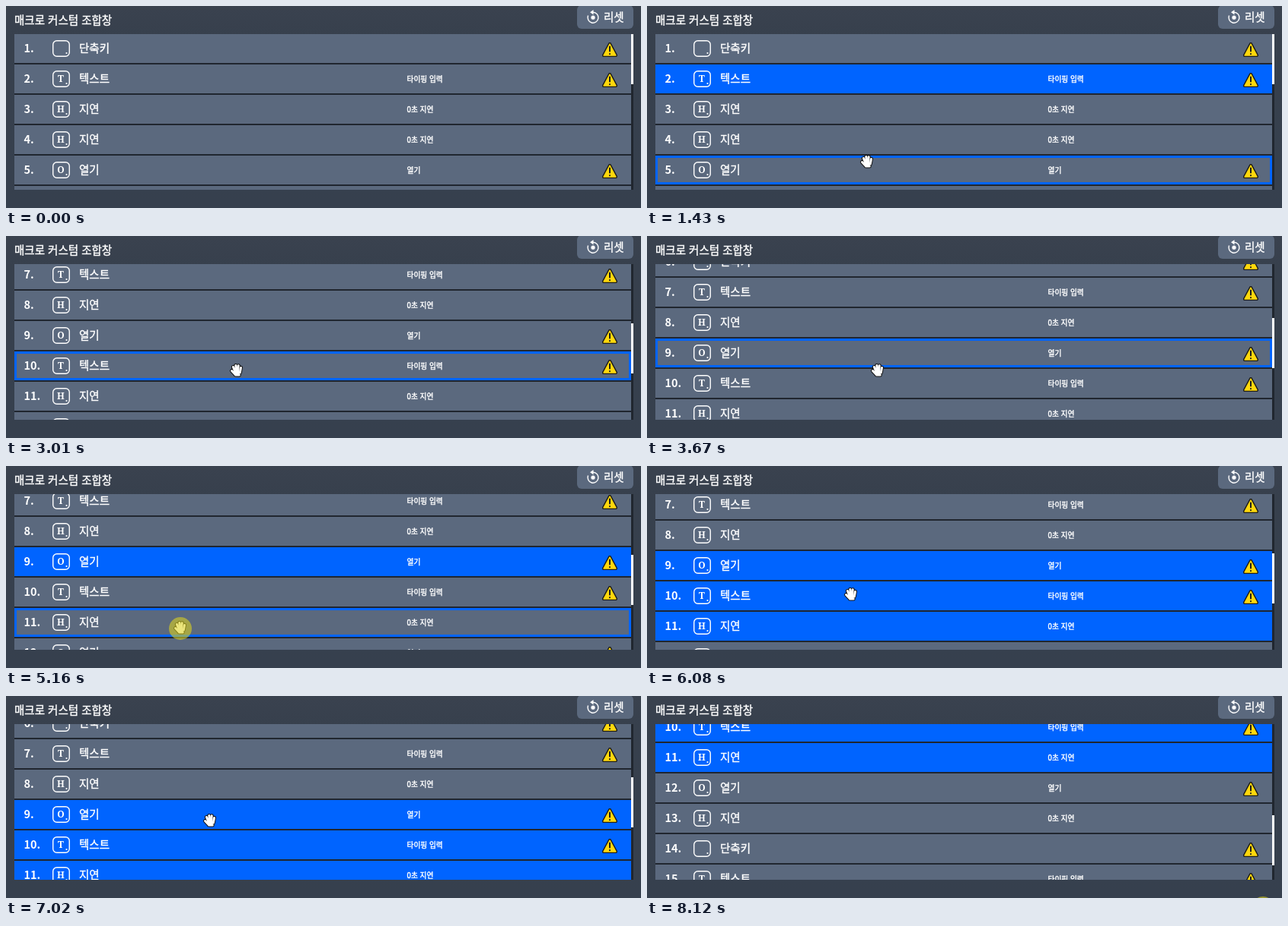
These frames come from a looping animation (834 px wide and 266 px high, 8.19 s). An HTML page:

```html
<!DOCTYPE html>
<html lang="ko">
<head>
<meta charset="utf-8">
<style>
html, body { margin: 0; width: 100%; height: 100%; overflow: hidden; background: #37404d; }
svg { display: block; }
text { fill: #fff; stroke: #fff; stroke-width: .4; font: 14.5px "Noto Sans CJK KR", "Noto Sans CJK", sans-serif; }
.num { font-weight: 700; stroke: none; }
.key { font: 700 12px "Noto Serif", serif; text-anchor: middle; stroke: none; }
.note { font-size: 9.7px; }
.line { fill: none; stroke: #fff; stroke-width: 1.4; }
.hand { fill: none; stroke-linecap: round; stroke-linejoin: round; }
</style>
</head>
<body>
<svg width="834" height="266" viewBox="0 0 834 266">
  <defs>
    <linearGradient id="bg" x2="0" y2="1">
      <stop stop-color="#3a424f"/><stop offset=".15" stop-color="#37404d"/><stop offset="1" stop-color="#36404e"/>
    </linearGradient>
    <clipPath id="view"><rect x="11" y="37" width="810" height="205"/></clipPath>
    <g id="warn" stroke-linejoin="round" stroke-linecap="round">
      <path id="tri" d="M793 13 L801 28 H785 Z" fill="#ffd80c" stroke="#1d1d1b" stroke-width="3.8"/>
      <use href="#tri"/>
      <path d="M793 13 L801 28 H785 Z" fill="#ffd80c" stroke="#ffd80c" stroke-width="1.4"/>
      <path d="M793 16.5 V22.5 M793 26 V26.2" stroke="#1d1d1b" stroke-width="2"/>
    </g>
    <path id="fingers" d="M-4.6-4.5-2 2M-1.2-6.4-.5 2M2.2-6.3 1.5 2M5.5-3.6 4.3 3M-6.5.5-1.8 5.5M-2 3H3.5M-1.5 6H3.2"/>
  </defs>
  <rect width="834" height="266" fill="url(#bg)"/>
  <text x="11" y="23.5">매크로 커스텀 조합창</text>
  <rect x="750" y="-1" width="74" height="31" rx="6" fill="#5b697e"/>
  <path class="line" d="M764.5 12.5 A7 7 0 1 0 771 8.2 H769"/>
  <path d="M771.5 5 V11.4 L767 8.2 Z" fill="#fff"/>
  <circle cx="771" cy="15.2" r="2.6" fill="#fff"/>
  <text x="785" y="20">리셋</text>
  <rect x="11" y="37" width="813" height="205" fill="#20262f"/>
  <g clip-path="url(#view)"><g id="list"></g></g>
  <rect id="thumb" x="821" width="3" height="66" fill="#fff"/>
  <g id="cursor">
    <use class="hand" href="#fingers" stroke="#111" stroke-width="5"/>
    <use class="hand" href="#fingers" stroke="#fff" stroke-width="3"/>
    <circle id="press" r="15" cy="1" fill="#dcd21e" fill-opacity=".58"/>
  </g>
</svg>
<script>
const LOOP = 8190, STEP = 70, TOP = 37, PITCH = 40, NOTCH = 125;
const GRAY = "#5b697e", BLUE = "#0064ff";
const $ = id => document.getElementById(id);
const kinds = {
  K: ["단축키", "", true, ""],
  T: ["텍스트", "타이핑 입력", true, "T"],
  H: ["지연", "0초 지연", false, "H"],
  O: ["열기", "열기", true, "O"]
};

$("list").innerHTML = [..."KTHHOKTHOTHOHKTH"].map((kind, i) => {
  const [label, note, warn, key] = kinds[kind];
  return `<g transform="translate(0 ${TOP + i * PITCH})">
    <rect class="back" x="11" width="810" height="38"/>
    <rect class="hover" x="12.5" y="1.5" width="807" height="35" fill="none" stroke="${BLUE}" stroke-width="3"/>
    <text class="num" x="23.5" y="23.5">${i + 1}.</text>
    <rect class="line" x="61.75" y="8.75" width="21.5" height="20.5" rx="5"/>
    <text class="key" x="72" y="23">${key}</text>
    <circle cx="79.5" cy="25" r="1.1" fill="#fff"/>
    <text x="96" y="23.7">${label}</text>
    <text class="note" x="526.5" y="22.6">${note}</text>
    ${warn ? '<use href="#warn"/>' : ""}
  </g>`;
}).join("") + `<g id="ring" fill="none">
    <rect x="12" y="197" width="808" height="38" stroke="#e59700" stroke-width="2"/>
    <rect x="10.5" y="195.5" width="811" height="41" stroke="#fff"/>
  </g>`;
const backs = document.querySelectorAll(".back"), hovers = document.querySelectorAll(".hover");

// Each click selects rows from..to when released
const clicks = [
  { down: 1020, up: 1090, from: 2, to: 2 },
  { down: 1980, up: 2120, from: 2, to: 5 },
  { down: 4430, up: 4500, from: 9, to: 9 },
  { down: 5160, up: 5230, from: 9, to: 11 },
  { down: 8120, up: LOOP }
];
// Wheel turns: start, signed notches
const wheel = [[2450, 2], [2990, -1], [3537, 1], [6000, -2], [6699, 3]];
// Cursor stops: arrival, x, y, travel time
const stops = [
  [750, 362, 111, 550], [1400, 289, 205, 180], [1900, 300, 221], [2380, 350, 173, 260], [2800, 303, 177],
  [4160, 253, 132], [4900, 229, 213], [5690, 268, 169], [6480, 268, 164], [7500, 809, 278]
];

const ease = u => (1 - Math.cos(Math.PI * Math.min(1, Math.max(0, u)))) / 2;
const show = (el, on) => el.setAttribute("visibility", on ? "visible" : "hidden");

function scrollAt(t) {
  let sum = 0;
  for (const [start, n] of wheel)
    for (let i = 0; i < Math.abs(n); i++)
      sum += Math.sign(n) * NOTCH * ease((t - start - i * 200) / 150);
  return Math.round(sum);
}

function cursorAt(t) {
  let x = 420, y = 252;
  for (const [end, toX, toY, ms = 430] of stops) {
    const u = ease(1 + (t - end) / ms);
    x += (toX - x) * u;
    y += (toY - y) * u;
  }
  return [Math.round(x), Math.round(y)];
}

function draw(now) {
  const t = now % LOOP;
  const frame = Math.floor(t / STEP) * STEP;

  const scroll = scrollAt(frame);
  $("list").setAttribute("transform", `translate(0 ${-scroll})`);
  $("thumb").setAttribute("y", TOP + Math.round(scroll * 0.32));

  const [x, y] = cursorAt(frame), tip = y - 6, shown = t >= 200;
  $("cursor").setAttribute("transform", `translate(${x} ${y})`);
  show($("cursor"), shown);
  show($("press"), clicks.some(c => t >= c.down && t < c.up));

  const inside = shown && tip >= TOP && tip < 242 && x < 821;
  const over = inside ? Math.floor((tip - TOP + scroll) / PITCH) : -1;
  backs.forEach((el, i) => {
    const on = clicks.some(c => t >= c.up && i + 1 >= c.from && i + 1 <= c.to);
    el.setAttribute("fill", on ? BLUE : GRAY);
    show(hovers[i], i === over);
  });
  show($("ring"), t >= clicks[1].up && t < clicks[2].down);
}

const origin = performance.now();
function tick() {
  draw(performance.now() - origin);
  requestAnimationFrame(tick);
}
tick();
</script>
</body>
</html>
```
